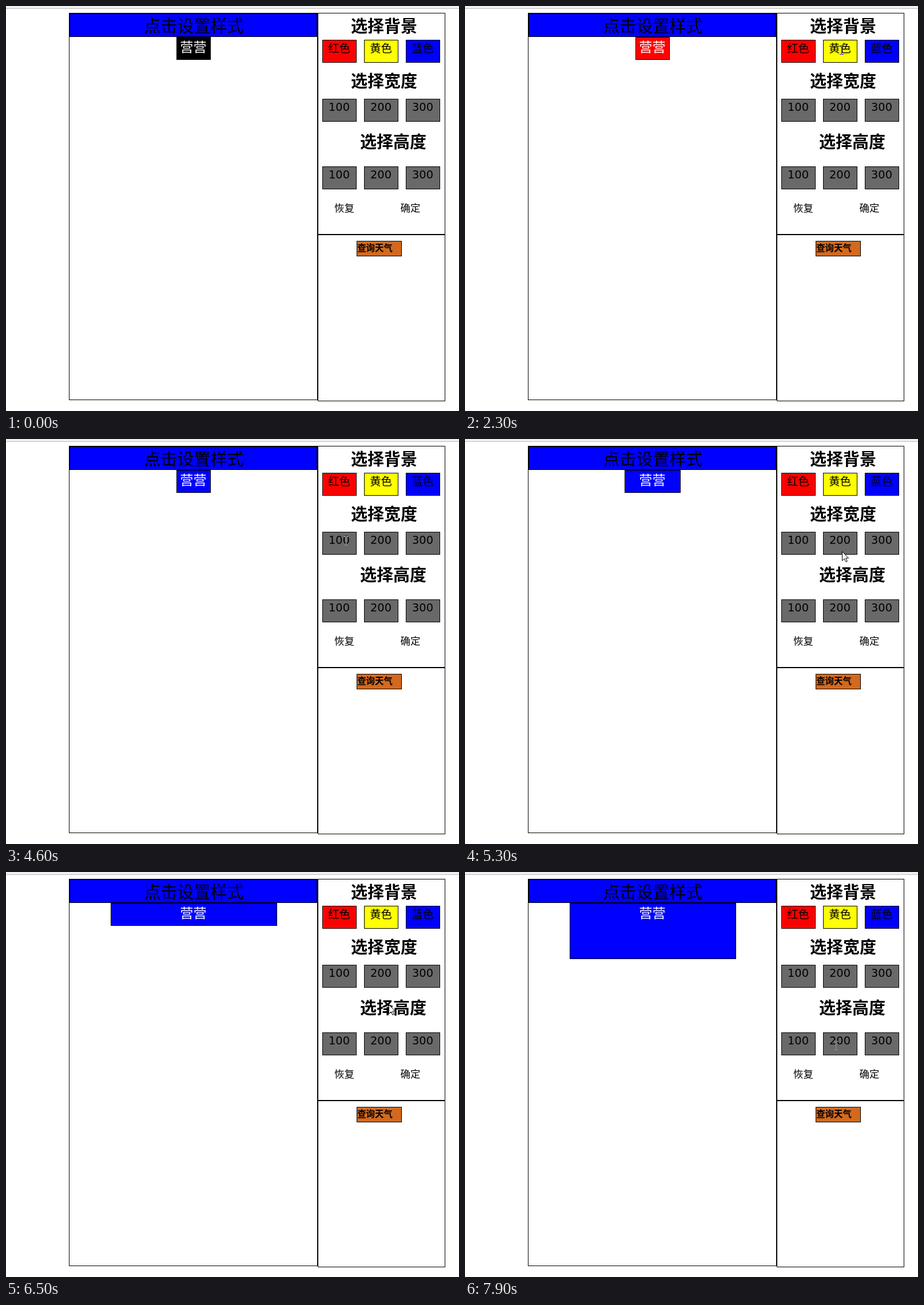
These frames come from a looping animation (792x707 px, 8000 ms). An HTML page:

```html
<!DOCTYPE html>
<html lang="zh">
<head>
<meta charset="utf-8">
<style>
  html, body { margin: 0; width: 100%; height: 100%; overflow: hidden; background: #fff; }
  svg { display: block; width: 792px; height: 707px; isolation: isolate; }
  rect { stroke: #000; shape-rendering: crispEdges; }
  .plain { stroke: none; }
  text { font-family: "Noto Sans CJK SC", "Noto Sans CJK", sans-serif; text-anchor: middle; }
  .digits { font-family: "DejaVu Sans", sans-serif; }
  #ibeam { mix-blend-mode: difference; fill: none; stroke: #fff; shape-rendering: crispEdges; }
</style>
</head>
<body>
<svg viewBox="0 0 792 707">
  <rect class="plain" width="792" height="707" fill="#fff"/>
  <rect class="plain" width="792" height="4" fill="#f0f0f0"/>
  <rect class="plain" y="4" width="792" height="1" fill="#bcbcbc"/>
  <g id="page"></g>
  <rect id="box" y="54.5"/>
  <text x="327.5" y="80" font-size="23.2" fill="#fff">营营</text>
  <path id="arrow" d="M.5.5v16l3.8-3.6 2.6 5.6 2.4-1.1-2.6-5.4h4.8z" fill="#fff" stroke="#000"/>
  <path id="ibeam" d="M-3 -7.5H0M1 -7.5H4M.5 -7V7M-3 7.5H0M1 7.5H4"/>
</svg>
<script>
const $ = id => document.getElementById(id);

function setAll(el, attrs) {
  for (const key in attrs) el.setAttribute(key, attrs[key]);
}
function add(tag, attrs, content = '') {
  const el = document.createElementNS('http://www.w3.org/2000/svg', tag);
  setAll(el, attrs);
  el.textContent = content;
  $('page').append(el);
}
const rect = (x, y, width, height, fill = 'none') =>
  add('rect', { x: x + .5, y: y + .5, width, height, fill });
// The label is placed by the centre of its em box.
const label = (content, x, middle, size, weight = 400) =>
  add('text', { x, y: middle + size * .38, 'font-size': size, 'font-weight': weight }, content);

const column = i => 553 + 73 * i;
const rowTops = [59, 162, 280];
const colors = ['#f00', '#ff0', '#00f'];

rect(110, 12, 434, 675);
rect(111, 13, 432, 40, '#00f');
rect(545, 12, 222, 386);
rect(545, 399, 222, 290);
label('点击设置样式', 328.5, 35, 29);
label('选择背景', 661, 35, 29, 700);
label('选择宽度', 661, 131, 29, 700);
label('选择高度', 677, 237, 29, 700);

rowTops.forEach((top, row) => {
  for (let i = 0; i < 3; i++) {
    rect(column(i), top, 59, 39, row ? '#696969' : colors[i]);
    const x = column(i) + 29.5;
    if (row) add('text', { x, y: top + 21, 'font-size': 19.33, class: 'digits' }, (i + 1) * 100);
    else label(['红色', '黄色', '蓝色'][i], x, top + 15, 19.33);
  }
});
label('恢复', 591.5, 352, 17.4);
label('确定', 707, 352, 17.4);
rect(613, 410, 78, 26, '#d2691e');
label('查询天气', 645, 422, 15.4, 700);

// Each trip eases out to its stop, sagging below the straight line on the way.
const entry = { x: 850, y: 45 };
const trips = [
  { start: 100, end: 1000, x: 578, y: 81, sag: 36 },
  { start: 1300, end: 2200, x: 658, y: 77, sag: 24 },
  { start: 2800, end: 3600, x: 721, y: 78, sag: 18 },
  { start: 3800, end: 4600, x: 594, y: 178, sag: 0 },
  { start: 4800, end: 5700, x: 665, y: 183, sag: 14 },
  { start: 5700, end: 6300, x: 731, y: 183, sag: 17 },
  { start: 6400, end: 7000, x: 585, y: 296, sag: 0 },
  { start: 7100, end: 7900, x: 648, y: 303, sag: 16 }
];

function pointerAt(t) {
  const i = Math.max(0, trips.findLastIndex(trip => t >= trip.start));
  const from = trips[i - 1] || entry, to = trips[i];
  const k = Math.min(1, Math.max(0, (t - to.start) / (to.end - to.start)));
  const ease = 1 - (1 - k) ** 3;
  return {
    x: Math.round(from.x + (to.x - from.x) * ease),
    y: Math.round(from.y + (to.y - from.y) * ease + to.sag * Math.sin(Math.PI * k) ** 2)
  };
}

const overLabel = ({ x, y }) =>
  [0, 1, 2].some(i => Math.abs(x - column(i) - 29) < 20) &&
  rowTops.some(top => y >= top + 3 && y <= top + 25);

function draw(now) {
  const t = Math.floor(now % 8000 / 100) * 100;

  const fill = t < 1400 ? '#000' : t < 2900 ? colors[0] : t < 3900 ? colors[1] : colors[2];
  const width = t < 4900 ? 60 : t < 5700 ? 100 : t < 6500 ? 200 : 300;
  const height = t < 7200 ? 40 : 100;
  const left = Math.round(327.3 - width * .482);
  const right = Math.round(328.2 + width * .482);
  setAll($('box'), {
    fill, x: left + .5, width: right - left, height: Math.round(.6 + height * .967)
  });

  const pointer = pointerAt(t);
  const beam = overLabel(pointer);
  for (const [id, shown] of [['arrow', !beam], ['ibeam', beam]]) {
    setAll($(id), {
      transform: `translate(${pointer.x} ${pointer.y})`,
      visibility: t >= 200 && shown ? 'visible' : 'hidden'
    });
  }
}

function tick() {
  draw(performance.now());
  requestAnimationFrame(tick);
}
tick();
</script>
</body>
</html>
```
